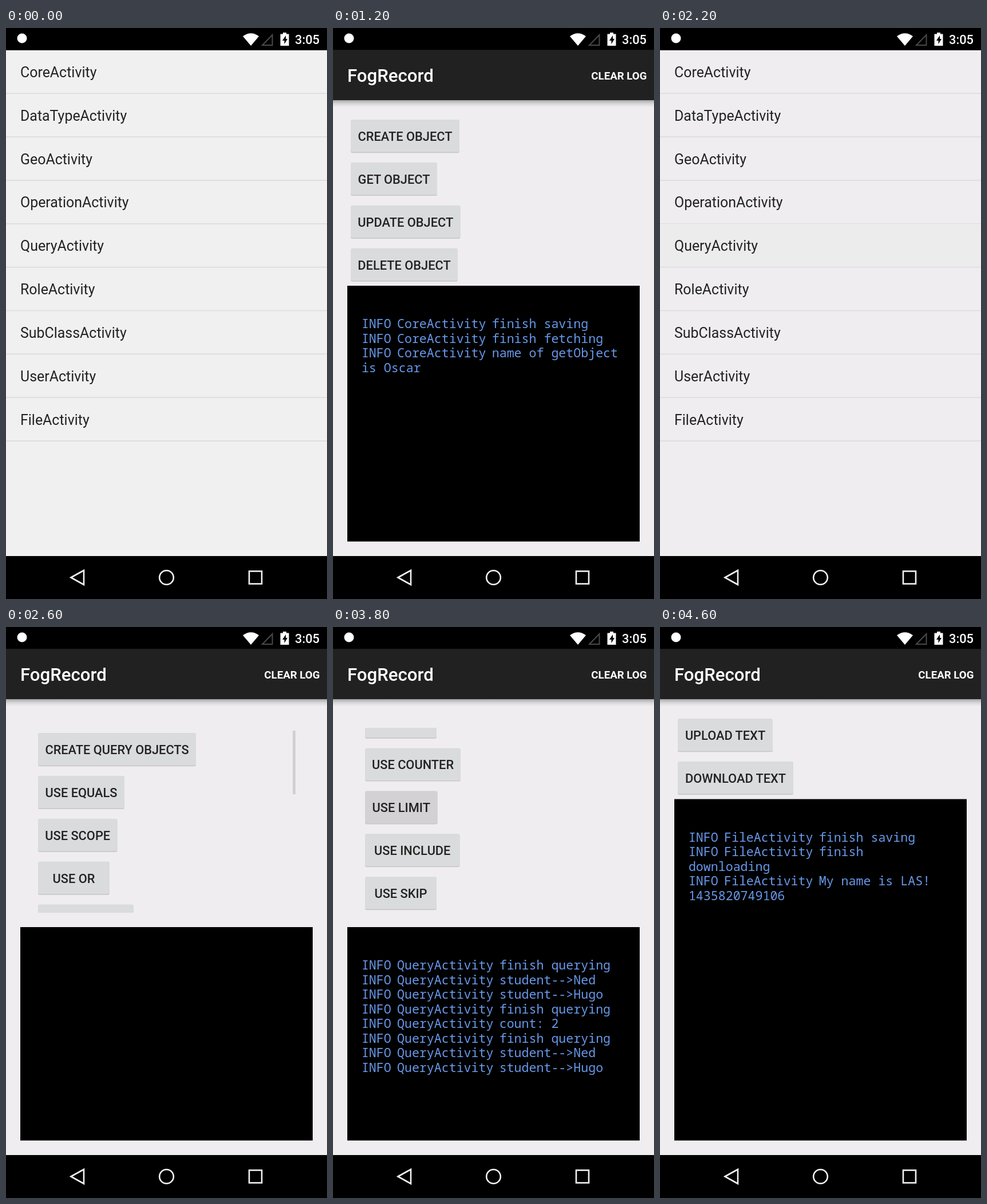
An HTML page that plays this animation: 561 px wide and 997 px high, repeating every 4800 ms.

```html
<!DOCTYPE html>
<html lang="en">
<head>
<meta charset="utf-8">
<title>Activity demo</title>
<style>
  html, body { margin: 0; width: 100%; height: 100%; overflow: hidden; background: #000; }
  svg { display: block; width: 100vw; height: 100vh; }
  text { font-family: Roboto, sans-serif; fill: #222; }
  .item { font-size: 24.93px; }
  .title { font-size: 31.2px; font-weight: 500; fill: #fff; }
  .action { font-size: 18.7px; font-weight: 700; fill: #fff; text-anchor: end; }
  .label { font-size: 21.8px; font-weight: 500; text-anchor: middle; }
  .clock { font-size: 21.8px; font-weight: 500; fill: #fff; }
  .toast { font-size: 21.8px; fill: #fff; text-anchor: middle; }
  .log { font-family: "Noto Sans Mono", monospace; font-size: 21.6px; fill: #6799ea; }
</style>
</head>
<body>
<svg viewBox="0 0 561 997" preserveAspectRatio="none">
  <defs>
    <linearGradient id="shade" x1="0" y1="0" x2="0" y2="1">
      <stop offset="0" stop-color="#000" stop-opacity=".3"/>
      <stop offset=".5" stop-color="#000" stop-opacity=".1"/>
      <stop offset="1" stop-color="#000" stop-opacity="0"/>
    </linearGradient>
    <clipPath id="view"><rect x="50" y="176" width="461" height="323"/></clipPath>
  </defs>
  <g id="screen"></g>
  <g id="status">
    <rect width="561" height="38.600" fill="#000"/>
    <circle cx="28" cy="18" r="8.5" fill="#fff"/>
    <path d="M428 31 L414 14.5 Q428 4 442 14.5Z" fill="#fff"/>
    <path d="M448 30 H465.5 V12Z" fill="none" stroke="#4a4a4a" stroke-width="2"/>
    <path d="M484 8h6v2.500h4.500v20.500h-15v-20.500h4.500z" fill="#fff"/>
    <path d="M489 13l-6 9h3.500v6l5.500-9h-3z" fill="#000"/>
    <text class="clock" x="505" y="28">3:05</text>
  </g>
  <g id="nav" fill="none" stroke="#f2f2f2" stroke-width="2.6">
    <rect y="922" width="561" height="75" fill="#000" stroke="none"/>
    <path d="M113.500 959.500 L136 947 V972Z"/>
    <circle cx="280.500" cy="959.500" r="12.300"/>
    <rect x="425" y="948.500" width="22" height="22"/>
  </g>
</svg>
<script>
const LOOP = 4800, STEP = 200;
const screen = document.getElementById('screen');

const activities = ['Core', 'DataType', 'Geo', 'Operation', 'Query', 'Role', 'SubClass', 'User', 'File'];
const coreButtons = [['CREATE OBJECT', 190], ['GET OBJECT', 151], ['UPDATE OBJECT', 191.5], ['DELETE OBJECT', 187]];
const queryButtons = [['CREATE QUERY OBJECTS', 276], ['USE EQUALS', 151], ['USE SCOPE', 138.5], ['USE OR', 125],
  ['USE COUNTER', 167], ['USE LIMIT', 126.5], ['USE INCLUDE', 165.5], ['USE SKIP', 125], ['USE ORDER', 140]];
const fileButtons = [['UPLOAD TEXT', 166], ['DOWNLOAD TEXT', 202]];

// Entries starting with "+" continue the previous line.
const fetched = ['finish fetching', 'name of getObject', '+is Oscar'];
const coreLog = ['finish saving', ...fetched, 'finish updating', ...fetched];
const students = ['finish querying', 'student-->Ned', 'student-->Hugo'];
const queryLog = [...students, 'finish querying', 'count: 2', ...students];
const fileLog = ['finish saving', 'finish', '+downloading', 'My name is LAS!', '+1435820749106'];

const rect = (x, y, w, h, fill, r = 0) =>
  `<rect x="${x}" y="${y}" width="${w}" height="${h}" rx="${r}" fill="${fill}"/>`;
const text = (cls, x, y, body) => `<text class="${cls}" x="${x}" y="${y}">${body}</text>`;
const page = fill => rect(0, 38.6, 561, 883.4, fill);

function list(fill, pressed = -1) {
  const pitch = 75.85;
  return page(fill) + activities.map((name, i) => {
    const top = 38.6 + i * pitch;
    return (i === pressed ? rect(0, top, 561, pitch, '#ebeceb') : '') +
      text('item', 25, top + 47.2, name + 'Activity') +
      rect(0, top + pitch - 1, 561, 1.6, '#dcdbdd');
  }).join('');
}

function buttons(items, x, y, pressed) {
  return items.map(([name, w], i) => {
    const top = y + i * 74.85;
    return rect(x, top + 1.2, w, 57, '#c9c8ca', 3) +
      rect(x, top, w, 56.5, i === pressed ? '#d3d1d3' : '#dadbdc', 3) +
      text('label', x + w / 2, top + 37, name);
  }).join('');
}

function logBox(top, tag, lines) {
  const part = body => `<tspan dx="-2.7">${body.replace('>', '&gt;')}</tspan>`;
  const body = lines.map((line, i) => text('log', 49.9, top + 74 + i * 25.5,
    line[0] === '+' ? line.slice(1) : `INFO ${part(tag + 'Activity')} ${part(line)}`));
  return rect(25, top, 511, 896.6 - top, '#000') + body.join('');
}

const appBar = () => rect(0, 126, 561, 12, 'url(#shade)') + rect(0, 38.6, 561, 87.4, '#212121') +
  text('title', 25, 94, 'FogRecord') + text('action', 548.5, 90, 'CLEAR LOG');

const detail = body => page('#efedf0') + appBar() + body;

const toast = message => rect(104, 754, 352, 69, '#2b2b2b', 34) + text('toast', 280, 796, message);

const core = (count, pressed, extra = '') =>
  detail(buttons(coreButtons, 31, 160, pressed) + logBox(450, 'Core', coreLog.slice(0, count)) + extra);

function query(count, scroll, bar, pressed) {
  const thumb = bar ? rect(501, 181 + scroll * 0.344, 5, 111, '#d1d0d2') : '';
  return detail(`<g clip-path="url(#view)">${buttons(queryButtons, 56, 185 - scroll, pressed)}${thumb}</g>` +
    logBox(524, 'Query', queryLog.slice(0, count)));
}

const file = count => detail(buttons(fileButtons, 31, 160) + logBox(300.5, 'File', fileLog.slice(0, count)));

const scenes = [
  [0, () => list('#f0f0f0')],
  [400, () => core(0)],
  [600, () => core(0, -1, toast('Creating a new student object'))],
  [800, () => core(1)],
  [1000, () => core(1, 1)],
  [1200, () => core(4)],
  [1400, () => core(5)],
  [1800, () => core(8)],
  [2000, () => core(0)],
  [2200, () => list('#efedf0', 4)],
  [2600, () => query(0, 0, true)],
  [2800, () => query(3, 0, false)],
  [3000, () => query(3, 100, true)],
  [3200, () => query(3, 139.3, false, 4)],
  [3400, () => query(5, 139.3, false, 4)],
  [3600, () => query(5, 273, true)],
  [3800, () => query(8, 273, false, 5)],
  [4200, () => list('#efedf0', 8)],
  [4400, () => file(0)],
  [4600, () => file(5)]
];

let shown = -1;
function draw(time) {
  const step = Math.floor((time % LOOP) / STEP) * STEP;
  const index = scenes.filter(([start]) => start <= step).length - 1;
  if (index !== shown) {
    shown = index;
    screen.innerHTML = scenes[index][1]();
  }
}

const origin = performance.now();
function tick() {
  draw(performance.now() - origin);
  requestAnimationFrame(tick);
}
tick();
</script>
</body>
</html>
```
